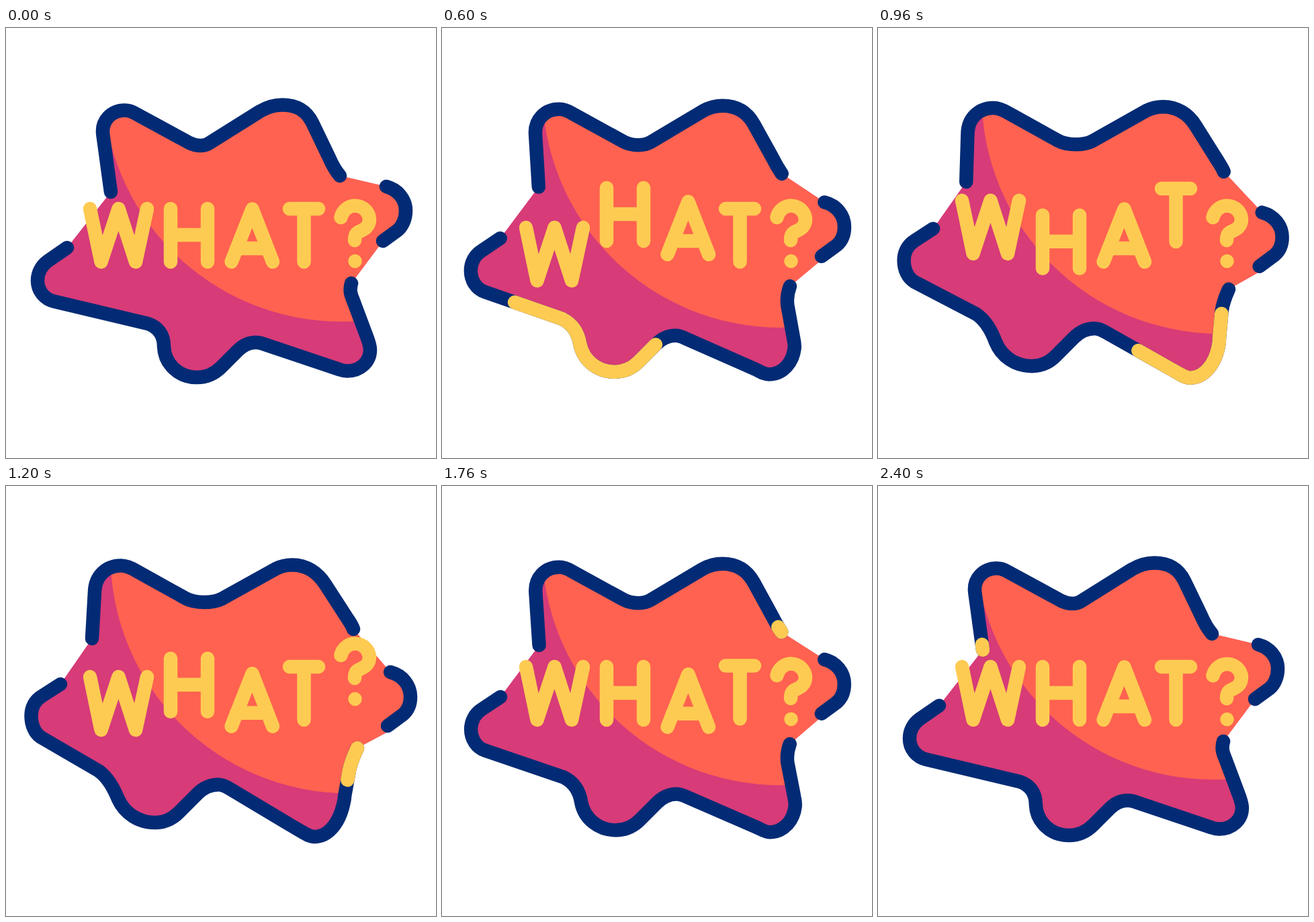
Write an HTML page that moves like this. It is 640 px wide and 640 px high and loops after 2440 ms.

```html
<!DOCTYPE html>
<html lang="en">
<head>
<meta charset="utf-8">
<title>What?</title>
<style>
  html, body { margin: 0; width: 100%; height: 100%; overflow: hidden; background: #fff; }
  svg { display: block; width: 100%; height: 100%; }
  .line { fill: none; stroke-width: 20.5; stroke-linecap: round; stroke-linejoin: round; }
  .navy { stroke: #032b75; }
  .yellow { stroke: #fecb52; }
</style>
</head>
<body>
<svg viewBox="0 0 640 640" role="img" aria-label="WHAT?">
  <defs><clipPath id="inside"><path id="mask"/></clipPath></defs>
  <path id="blob" fill="#d73b78"/>
  <g clip-path="url(#inside)"><circle id="light" r="354.5" fill="#ff6250"/></g>
  <g id="outline"></g>
  <g id="letters"></g>
</svg>
<script>
const LOOP = 2440, STEP = 40, PEAK = 1120;

// Each outline piece: its two poses and the [start, end] times of the highlight's head and tail.
const pieces = [
  {
    rest: "M156 244L144.5 160C141 138 157 122.5 177 122.5C183 122.5 188 124.5 193 127.5L273 171" +
      "C279 174 284 175 289 175C294 175 299 174 303 171L378 124C390 117 402 114.5 411 114.5" +
      "C433 114.5 447 123 456 141L481 193C487 207 491 213 497 220",
    bent: "M128 227L132 157C133 134 149 118.5 171 118.5C179 118.5 187 122 195 127L267 167" +
      "C276 172 287 173 295 173C303 173 313 172 321 168L402 123C410 119 418 117.5 426 117.5" +
      "C447 117.5 464 129 475 146L508 197C512 203 515 207 517 213",
    head: [1715, 2315], tail: [1845, 2443]
  },
  {
    rest: "M566 236C582 240 595 254 595 272C595 284 590 295 583 301L561 317",
    bent: "M572 277C591 282 602 297 602 314C602 325 598 334 591 340L568 357",
    head: [1360, 1640], tail: [1520, 1760],
    early: true
  },
  {
    rest: "M514 380C511 390 513 397 517 406L538 462C540 468 542 473 542 479" +
      "C542 497 527 510.5 508 510.5C503 510.5 501 510 497 508.5L384 470.5C380 469 376 468 372 468" +
      "C362 468 352 473 345 480L320 505C310 515 298 520 284 520C257 520 236 500 235 474" +
      "C235 456 226 445 211 440L72 407C57 403.5 47 391 47 376C47 364 53 353.5 62 347L91 327",
    bent: "M523 390C517 403 513 412 511 423L504 462C504 466 503 470 502 474" +
      "C496 501 480 522 459 522C451 522 441 515 429 508L332 450C327 447 321 444.5 316 444.5" +
      "C303 444.5 293 450 285 458L257 486C248 495 236 501 222 501C198 501 177 488 167 466" +
      "C161 452 153 435 138 424L52 374C43 368 37.5 356 37.5 342C37.5 330 43 319 53 313L81 295",
    head: [5, 1110], tail: [285, 1370]
  }
];

const glyphs = [
  "M125 269L141.5 348L167.5 269L193 348L210 269",
  "M245 269V348M300 269V348M245 308H300",
  "M335.5 348L366.5 269.5L397 348M343 328H389",
  "M422 269H465M443.5 269V348",
  "M498.5 282A21.5 21.5 0 0 1 541 284C541 297 532 300 526 303C521 305 519 308 519 316M519.5 347V347.01"
];

// Vertical bounce of one letter: [ms since its start, offset].
const bounce = [
  [0, 0], [80, -11], [200, -30], [260, -35], [320, -31], [440, 0], [520, 24], [560, 28],
  [680, 9.7], [760, 0], [900, -13], [1020, 1], [1160, 15], [1260, 9.5], [1420, 0]
];

const $ = id => document.getElementById(id);
const clamp = v => Math.max(0, Math.min(1, v));
const mix = (a, b, k) => a + (b - a) * k;
const smooth = ([from, to], t) => {
  const x = clamp((t - from) / (to - from));
  return x * x * (3 - 2 * x);
};

function addPath(parent, className, d) {
  const path = document.createElementNS("http://www.w3.org/2000/svg", "path");
  path.setAttribute("class", className);
  if (d) path.setAttribute("d", d);
  return $(parent).appendChild(path);
}

function morph(from, to, k) {
  const ends = to.match(/[\d.]+/g);
  let i = 0;
  return from.replace(/[\d.]+/g, n => mix(+n, +ends[i++], k).toFixed(2));
}

// Cubic timing curve (1/3, 0, 5/6, 5/6): slow start, straight finish.
function easeIn(x) {
  let low = 0, high = 1;
  for (let i = 0; i < 24; i++) {
    const u = (low + high) / 2, v = 1 - u;
    if (v * v * u + 2.5 * v * u * u + u * u * u < x) low = u; else high = u;
  }
  return 2.5 * (1 - low) * low * low + low ** 3;
}

const slope = i => (bounce[i + 1][1] - bounce[i][1]) / (bounce[i + 1][0] - bounce[i][0]);

function tangent(i) {
  if (i === 0) return slope(0);
  if (i === bounce.length - 1) return 0;
  const a = slope(i - 1), b = slope(i);
  return a * b > 0 ? 2 * a * b / (a + b) : 0;
}

function bounceAt(t) {
  const next = bounce.findIndex(key => key[0] > t);
  if (next < 1) return 0;
  const [t0, y0] = bounce[next - 1], [t1, y1] = bounce[next];
  const span = t1 - t0, x = (t - t0) / span, s = x * x * (3 - 2 * x);
  return mix(y0, y1, s) + span * x * (1 - x) * (tangent(next - 1) * (1 - x) - tangent(next) * x);
}

for (const piece of pieces) piece.base = addPath("outline", "line navy");
for (const piece of pieces) {
  piece.glow = addPath("outline", "line yellow");
  piece.glow.setAttribute("pathLength", 1);
}
const letters = glyphs.map(d => addPath("letters", "line yellow", d));

function drawHighlight({ glow, head, tail }, t) {
  const front = smooth(head, t), back = smooth(tail, t);
  const length = front - back;
  glow.style.display = length > 0.0005 ? "" : "none";
  glow.setAttribute("stroke-dasharray", `${length} 2`);
  glow.setAttribute("stroke-dashoffset", front - 1);
}

function draw(t) {
  const bend = 1.075 * easeIn(t < PEAK ? t / PEAK : (LOOP - t) / (LOOP - PEAK));
  const earlyBend = bend + 0.55 * bend * (1 - bend);

  const shapes = pieces.map(piece => {
    const d = morph(piece.rest, piece.bent, piece.early ? earlyBend : bend);
    piece.base.setAttribute("d", d);
    piece.glow.setAttribute("d", d);
    drawHighlight(piece, t);
    return d;
  });

  const [top, right, bottom] = shapes;
  const corner = morph("L561 317", "L568 366", earlyBend);
  const body = top + right.replace("M", "L") + corner + bottom.replace("M", "L") + "Z";
  $("blob").setAttribute("d", body);
  $("mask").setAttribute("d", body);
  $("light").setAttribute("cx", mix(499, 510, bend));
  $("light").setAttribute("cy", mix(82.5, 103, bend));

  letters.forEach((letter, i) => {
    letter.setAttribute("transform", `translate(0 ${bounceAt(t - 40 - 240 * i).toFixed(2)})`);
  });
}

const start = performance.now();
function frame() {
  const t = (performance.now() - start) % LOOP;
  draw(Math.floor(t / STEP) * STEP);
  requestAnimationFrame(frame);
}
frame();
</script>
</body>
</html>
```
